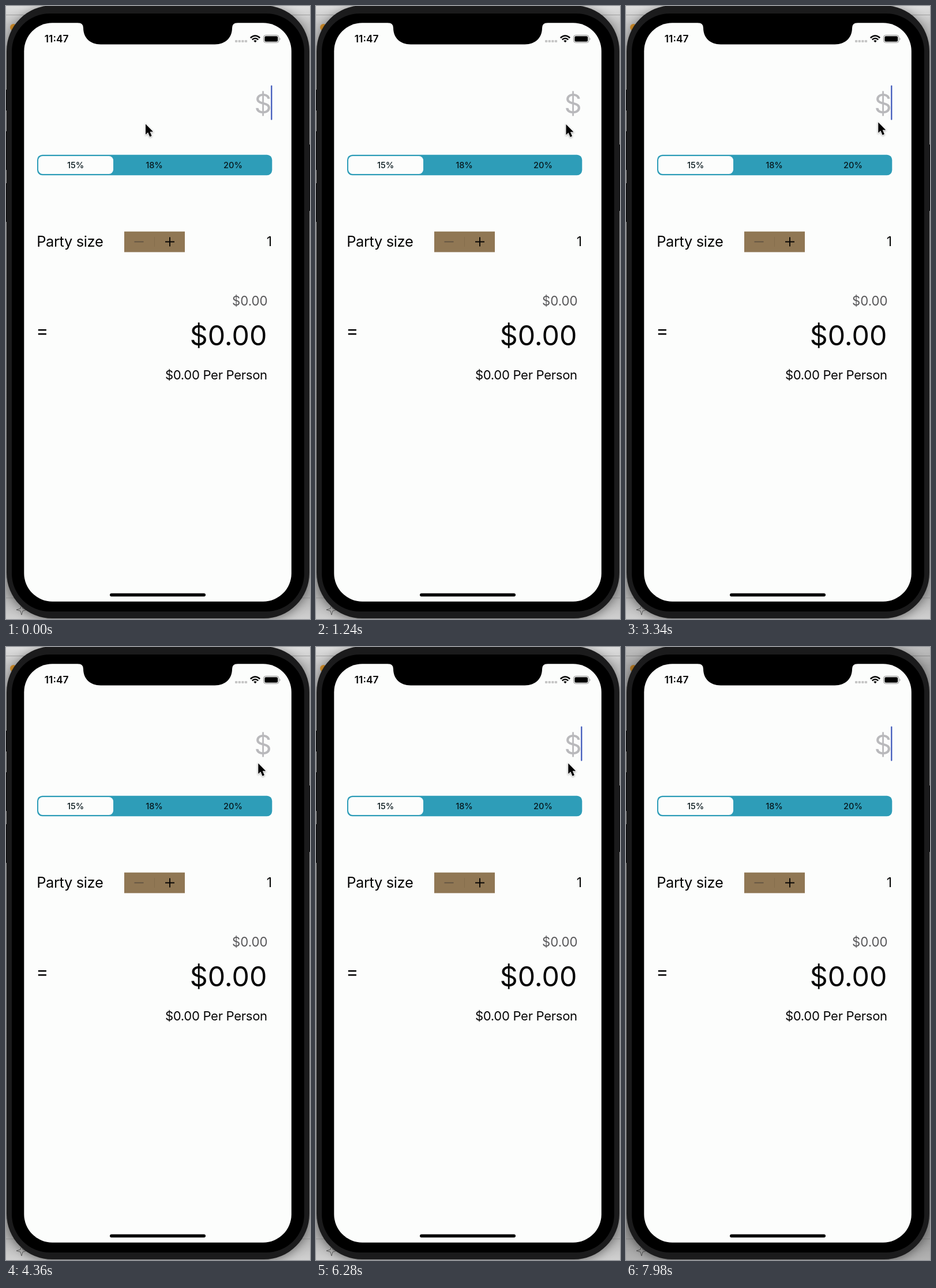
An HTML page for the animation above (8000 ms loop, 527 by 1062 pixels).

```html
<!DOCTYPE html>
<html lang="en">
<head>
<meta charset="utf-8">
<title>Tip calculator</title>
<style>
html, body { margin: 0; width: 100%; height: 100%; overflow: hidden; background: #000; }
svg { display: block; width: 100%; height: 100%; }
text { font-family: Inter, Roboto, sans-serif; fill: #050505; }
.end { text-anchor: end; }
.tab { text-anchor: middle; font-size: 14.6px; font-weight: 500; fill: #07171c; }
.body { filter: drop-shadow(0 3px 9px rgba(0, 0, 0, .45)); }
.pointer { filter: drop-shadow(0 1.5px 1.5px rgba(0, 0, 0, .35)); }
</style>
</head>
<body>
<svg viewBox="0 0 527 1062" preserveAspectRatio="none">
  <defs>
    <linearGradient id="desk" x2="0" y2="1">
      <stop offset="0" stop-color="#dedede"/>
      <stop offset=".03" stop-color="#c4c4c4"/>
      <stop offset=".96" stop-color="#b4b4b4"/>
      <stop offset="1" stop-color="#d0d0d0"/>
    </linearGradient>
  </defs>

  <!-- desktop behind the phone -->
  <rect width="527" height="1062" fill="url(#desk)"/>
  <path d="M0 15.5H527M0 1025.5H527" stroke="#a0a0a0"/>
  <circle cx="13" cy="37" r="6" fill="#d8922a"/>
  <path d="M27 1037l2 7 7 2-7 2-2 7-2-7-7-2 7-2z" fill="none" stroke="#666"/>
  <rect id="dim" width="527" height="1062" opacity="0"/>

  <!-- phone body -->
  <path d="M0 145v36M0 217v67M0 307v67M526.500 240v115" stroke="#080808" stroke-width="3"/>
  <rect class="body" x="1" y="-1" width="525" height="1062" rx="79" fill="#1b1b1c"/>
  <rect x="10" y="13" width="507" height="1036" rx="66"/>
  <rect x="31.300" y="29.200" width="463.500" height="1002.500" rx="49" fill="#fcfdfc"/>
  <path d="M124 28V29Q134 29 134 38C134 55 146 66.500 164 66.500H362C380 66.500 392 55 392 38Q392 29 402 29V28Z"/>

  <!-- status bar -->
  <text x="66.700" y="63" font-size="17.400" font-weight="600">11:47</text>
  <g fill="#c6c6c6">
    <rect x="397" y="59" width="4.300" height="4" rx="1"/>
    <rect x="402.600" y="59" width="4.300" height="4" rx="1"/>
    <rect x="408.200" y="59" width="4.300" height="4" rx="1"/>
    <rect x="413.800" y="59" width="4.300" height="4" rx="1"/>
  </g>
  <g fill="none" stroke="#050505" stroke-width="2.500">
    <path d="M423.800 55.200Q432 47.800 440.200 55.200M426.700 58.400Q432 53.600 437.300 58.400"/>
    <path d="M429.300 60.300Q432 58 434.700 60.300L432 63.300Z" fill="#050505" stroke="none"/>
  </g>
  <rect x="446.500" y="50.500" width="26.500" height="13" rx="3.800" fill="none" stroke="#8c8c8c"/>
  <rect x="448.300" y="52.300" width="22.900" height="9.400" rx="2.300"/>
  <path d="M474.500 54.700Q476.600 57 474.500 59.300Z" fill="#8c8c8c"/>

  <!-- amount -->
  <text class="end" x="460.700" y="185.500" font-size="47" style="fill:#b9b9bc">$</text>
  <rect id="caret" x="459.200" y="137.500" width="2.200" height="60" rx="1" fill="#3b55b9"/>

  <!-- tip choice -->
  <rect x="54" y="257.700" width="407.300" height="35.600" rx="9" fill="#2e9db8"/>
  <rect x="56" y="260" width="130" height="31" rx="7.500" fill="#fcfdfc"/>
  <text class="tab" x="120.700" y="280.700">15%</text>
  <text class="tab" x="257" y="280.700">18%</text>
  <text class="tab" x="393.500" y="280.700">20%</text>

  <!-- party size -->
  <text x="53.200" y="417" font-size="25.500" letter-spacing="-.4">Party size</text>
  <rect x="205" y="390.700" width="105" height="35.700" fill="#907754"/>
  <path d="M257.500 400V417" stroke="#846c4b"/>
  <path d="M222.500 408.500H238.500" stroke="#5f5140" stroke-width="1.700"/>
  <path d="M276 408.500H292M284 400.500V416.500" stroke="#080604" stroke-width="1.900"/>
  <text class="end" x="461" y="416" font-size="23">1</text>

  <!-- totals -->
  <text class="end" x="453.500" y="519" font-size="22.200" style="fill:#58585a">$0.00</text>
  <text x="52.300" y="574" font-size="32">=</text>
  <text class="end" x="452.300" y="587.500" font-size="48.200">$0.00</text>
  <text class="end" x="452.800" y="647" font-size="22.100" letter-spacing="-.32">$0.00 Per Person</text>

  <rect x="180" y="1017.500" width="166" height="5.500" rx="2.750"/>

  <g id="pointer" class="pointer">
    <path d="M0 0V18.200L4.100 14.500 7.300 22 10.600 20.600 7.500 13.300H13Z"
      fill="#000" stroke="#fff" stroke-width="1.600" paint-order="stroke"/>
  </g>
</svg>
<script>
const LOOP = 8000, BLINK = 800;
const $ = id => document.getElementById(id);
const caret = $('caret'), pointer = $('pointer'), dim = $('dim');
const clamp = v => Math.min(1, Math.max(0, v));

// pointer stops: time, x, y
const stops = [
  [0, 242, 204.5], [480, 242, 204.5], [1190, 433.5, 205],
  [1660, 433.5, 205], [2200, 437.3, 201.5], [6350, 437.3, 201.5],
  [6813, 463.3, 189], [7250, 535, 150], [LOOP, 535, 150]
];

// screen refresh cadence: three evenly spaced pictures shown for 20, 100 and 20 ms
function refresh(t) {
  const beat = t % 140;
  const n = beat < 20 ? 0 : beat < 120 ? 1 : 2;
  return t - beat + n * 140 / 3;
}

function pointerAt(t) {
  const i = Math.max(1, stops.findIndex(s => s[0] >= t));
  const [t0, x0, y0] = stops[i - 1], [t1, x1, y1] = stops[i];
  const p = clamp((t - t0) / (t1 - t0)), e = p * p * (3 - 2 * p);
  return [x0 + (x1 - x0) * e, y0 + (y1 - y0) * e];
}

// hidden around the middle of each blink, with a short fade on both sides
function caretAt(t) {
  const phase = ((t - 445) % BLINK + BLINK) % BLINK;
  const away = Math.min(phase, BLINK - phase);
  return clamp((away - 80) / 120);
}

function draw(t) {
  const shown = Math.min(refresh(t), LOOP);
  const [x, y] = pointerAt(shown);
  pointer.setAttribute('transform', `translate(${x.toFixed(2)} ${y.toFixed(2)})`);
  caret.setAttribute('opacity', caretAt(shown).toFixed(3));
  dim.setAttribute('opacity', shown > 6400 ? .14 : 0);
}

const start = performance.now();
function tick() {
  draw((performance.now() - start) % LOOP);
  requestAnimationFrame(tick);
}
tick();
</script>
</body>
</html>
```
